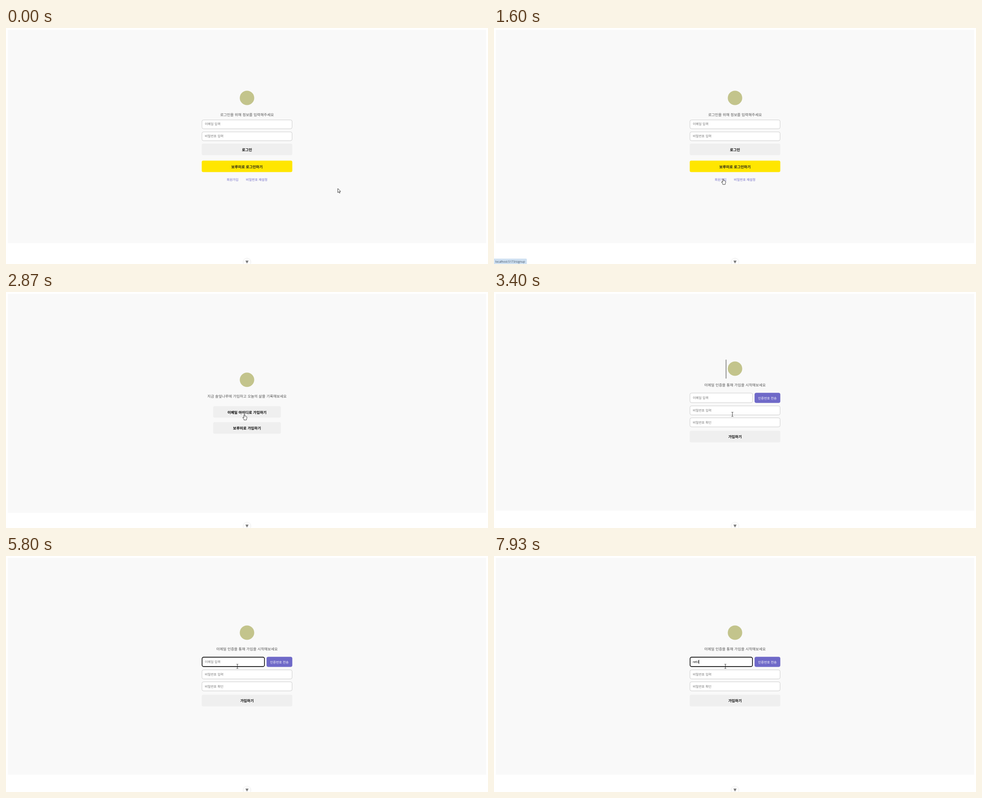
An HTML page with a canvas for the animation above (8000 ms loop, 1067 by 525 pixels).

```html
<!DOCTYPE html>
<html lang="ko">
<head>
<meta charset="utf-8">
<title>로그인</title>
<style>
html, body { margin: 0; width: 100%; height: 100%; overflow: hidden; background: #fff; }
canvas { display: block; }
</style>
</head>
<body>
<canvas id="stage" width="1067" height="525"></canvas>
<script>
const ctx = document.getElementById('stage').getContext('2d');
const SANS = '"Noto Sans CJK KR", "Noto Sans CJK", "Noto Sans", sans-serif';
const LOOP = 8000, FPS = 15;
const BIG = 8.12, SMALL = 7.12;
const PURPLE = '#6f69c8', GREY = '#efefef';
const TYPED = 'retil';
const KEY_TIMES = [6330, 6870, 7270, 7600, 7930];

// Pointer stops: time, x, y
const PATH = [
  [0, 734.5, 357], [330, 566, 279], [600, 532.3, 322], [800, 513, 330],
  [870, 513, 330], [1130, 507.3, 335.3], [2000, 507.3, 335.3], [2070, 506.8, 335.3],
  [2200, 506.8, 335.3], [2500, 563, 303], [2870, 527.7, 272], [3670, 527.7, 272],
  [3930, 511.5, 245.5], [4330, 511.5, 245.5], [4400, 512.2, 245.3], [8000, 512.2, 245.3]
];

function box(x, y, w, h, r, fill, stroke, line = 1) {
  const i = stroke ? line / 2 : 0;
  ctx.beginPath();
  ctx.roundRect(x + i, y + i, w - 2 * i, h - 2 * i, r);
  ctx.fillStyle = fill;
  ctx.fill();
  if (stroke) {
    ctx.strokeStyle = stroke;
    ctx.lineWidth = line;
    ctx.stroke();
  }
}

function text(str, x, y, size, color, align = 'center', weight = 400, family = SANS) {
  ctx.font = `${weight} ${size}px ${family}`;
  ctx.textRendering = 'geometricPrecision';
  ctx.textAlign = align;
  ctx.fillStyle = color;
  ctx.fillText(str, x, y + size * 0.37);
}

function field(y, h, label, labelY, w = 200.5, focus = false) {
  box(433.3, y, w, h, 3.5, '#fff', focus ? '#101010' : '#ccc', focus ? 1.6 : 1);
  text(label, 440, labelY, SMALL, '#757575', 'left');
}

function button(x, y, w, h, label, fill = GREY, color = '#000') {
  box(x, y, w, h, 3.5, fill);
  text(label, x + w / 2, y + h / 2 + 0.7, BIG, color, 'center', 700);
}

function panel(bottom, logoY) {
  ctx.fillStyle = '#f9f9f9';
  ctx.fillRect(4, 4, 1059, bottom - 4);
  ctx.fillStyle = '#c3c48c';
  ctx.beginPath();
  ctx.arc(533.5, logoY, 16, 0, Math.PI * 2);
  ctx.fill();
}

function loginPage() {
  panel(478.5, 155.5);
  text('로그인을 위해 정보를 입력해주세요', 533.5, 192.5, BIG, '#555');
  field(204, 20.7, '이메일 입력', 213.6);
  field(230.6, 20.7, '비밀번호 입력', 240.7);
  button(433.3, 257.3, 200.5, 25.6, '로그인');
  button(433.3, 295, 200.5, 25.6, '보루미로 로그인하기', '#ffe600', '#191919');
  text('회원가입', 501.5, 337.6, SMALL, PURPLE);
  text('비밀번호 재설정', 555, 337.6, SMALL, PURPLE);
}

function choicePage() {
  panel(491.5, 195.2);
  text('지금 솔잎나루에 가입하고 오늘의 삶을 기록해보세요', 533.5, 232, BIG, '#555');
  button(458.5, 254, 150, 25.6, '이메일 아이디로 가입하기');
  button(458.5, 289.6, 150, 25.6, '보루미로 가입하기');
}

function signupPage(now) {
  const focus = now >= 4200;
  const typed = TYPED.slice(0, KEY_TIMES.filter(k => now >= k).length);
  panel(486.5, 170.5);
  text('이메일 인증을 통해 가입을 시작해보세요', 533.5, 207.2, BIG, '#555');
  field(224.3, 22.4, typed ? '' : '이메일 입력', 235.5, 139.7, focus);
  box(576.8, 224.3, 57, 22.4, 4, PURPLE);
  text('인증번호 전송', 605.2, 235.9, SMALL, '#fff', 'center', 500);
  field(252.8, 21.2, '비밀번호 입력', 263.4);
  field(279.4, 21.2, '비밀번호 확인', 290);
  button(433.3, 308.5, 200.5, 26, '가입하기');
  if (!focus) return;
  text(typed, 440, 235.5, SMALL, '#000', 'left');
  if (typed || (now - 4200) % 1066 < 533) {
    ctx.fillStyle = '#000';
    ctx.fillRect(440 + (typed ? ctx.measureText(typed).width : 0), 231, 0.9, 9);
  }
}

function logoCaret(now, y) {
  const on = (now >= 2130 && now < 2670) || (now >= 3200 && now < 3730);
  if (!on) return;
  ctx.fillStyle = '#333';
  ctx.fillRect(513.2, y, 1, 42);
}

function statusBar(now) {
  if (now < 1270 || now >= 2130) return;
  ctx.globalAlpha = now < 1330 || now >= 2070 ? 0.5 : 1;
  box(-3, 513, 75.7, 15, 2, '#cfe0f1');
  text('localhost:5173/signup', 2.8, 519.2, 6.45, '#35475c', 'left', 400, '"Open Sans", sans-serif');
  ctx.globalAlpha = 1;
}

function scrollBadge() {
  box(524.5, 511.5, 18, 18, 9, '#fff', '#ececec');
  ctx.fillStyle = '#777';
  ctx.beginPath();
  ctx.moveTo(530, 517.5);
  ctx.lineTo(537, 517.5);
  ctx.lineTo(533.5, 524);
  ctx.fill();
}

// Hermite curve with flat tangents at turning points and rests
function slope(i, axis) {
  const a = PATH[i - 1], b = PATH[i], c = PATH[i + 1];
  if (!a || !c || (b[axis] - a[axis]) * (c[axis] - b[axis]) <= 0) return 0;
  return (c[axis] - a[axis]) / (c[0] - a[0]);
}

function pointer(t) {
  let i = 0;
  while (i < PATH.length - 2 && t >= PATH[i + 1][0]) i++;
  const a = PATH[i], b = PATH[i + 1], d = b[0] - a[0];
  const u = Math.min(1, (t - a[0]) / d), v = 1 - u;
  return [1, 2].map(k =>
    a[k] * (1 + 2 * u) * v * v + b[k] * u * u * (3 - 2 * u) +
    d * u * v * (slope(i, k) * v - slope(i + 1, k) * u));
}

function pointerKind(now, page, x, y) {
  const inside = (l, t, r, b) => x >= l && x <= r && y >= t && y <= b;
  if (page === 0) {
    return inside(433, 257, 634, 283) || inside(433, 295, 634, 321) ||
      inside(488, 332, 515, 343) ? 'hand' : 'arrow';
  }
  if (page === 1) {
    return now < 2070 || inside(458, 254, 609, 280) || inside(458, 289, 609, 316) ? 'hand' : 'arrow';
  }
  return inside(433, 224, 573, 247) || inside(433, 252, 634, 274) ? 'beam' : 'arrow';
}

const SHAPES = {
  arrow: new Path2D('M0 0V9.2L2.1 7.2L3.6 10.4L5 9.7L3.6 6.7H6.4Z'),
  hand: new Path2D('M-1 1Q0-.4 1 1V4.2Q2 3.6 2.6 4.6Q3.6 4.1 4.1 5.1Q5.5 4.8 5.5 6.4V8.6Q5.3 10 4.5 11V12.7H-.9V11.4L-3.6 7.6Q-3.7 6-2.2 6.7L-1 7.8Z'),
  beam: new Path2D('M-2-4.6H-.5L0-4.2L.5-4.6H2M0-4.2V4.4M-2 4.8H-.5L0 4.4L.5 4.8H2')
};

function drawPointer(now, t, page) {
  const [x, y] = pointer(t);
  const kind = pointerKind(now, page, x, y);
  ctx.save();
  ctx.translate(x, y);
  ctx.lineJoin = 'round';
  ctx.lineWidth = 0.8;
  ctx.fillStyle = '#fff';
  ctx.strokeStyle = '#111';
  if (kind !== 'beam') ctx.fill(SHAPES[kind]);
  ctx.stroke(SHAPES[kind]);
  ctx.restore();
}

function draw(ms) {
  const t = Math.floor((ms % LOOP + 4) * FPS / 1000) * 1000 / FPS;
  const now = t + 5; // absorbs rounding of the cue times
  const page = now < 1730 ? 0 : now < 3400 ? 1 : 2;
  ctx.fillStyle = '#fff';
  ctx.fillRect(0, 0, 1067, 525);
  [loginPage, choicePage, signupPage][page](now);
  if (page) logoCaret(now, page === 1 ? 175 : 150.5);
  scrollBadge();
  statusBar(now);
  drawPointer(now, t, page);
}

const start = performance.now();
function tick() {
  draw(performance.now() - start);
  requestAnimationFrame(tick);
}
tick();
</script>
</body>
</html>
```
